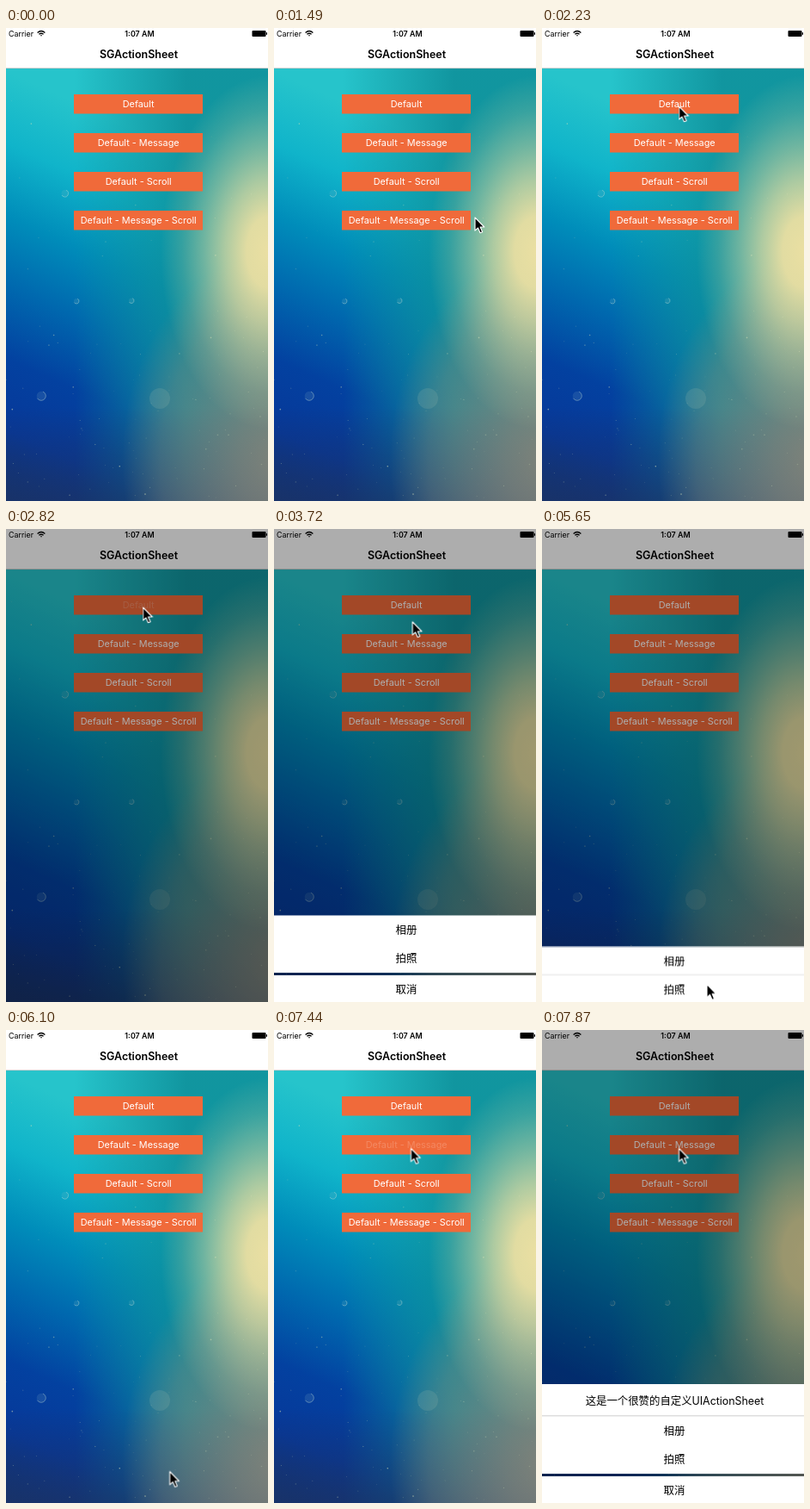
Recreate the animation shown at these times as an HTML page with a canvas. Size 305x549 px, loop 8000 ms.

```html
<!DOCTYPE html>
<html lang="en">
<head>
<meta charset="utf-8">
<title>SGActionSheet</title>
<style>
  html, body { margin: 0; width: 100%; height: 100%; overflow: hidden; background: #fff; }
  canvas, svg { position: absolute; left: 0; top: 0; width: 305px; height: 549px; display: block; }
  text { font-family: Inter, "Noto Sans CJK SC", "Noto Sans CJK", sans-serif; text-anchor: middle; }
  .status { font-size: 8.9px; }
  .title { font-size: 12.5px; font-weight: 600; }
  .label { font-size: 10.9px; fill: #fff; }
  .item { font-size: 12.5px; }
</style>
</head>
<body>
<canvas id="wall" width="305" height="549"></canvas>
<svg viewBox="0 0 305 549">
  <rect width="305" height="47" fill="#fff"/>
  <rect y="46.5" width="305" height=".6" fill="#a0a8a8"/>
  <text class="status" x="3" y="10" style="text-anchor:start">Carrier</text>
  <g fill="none" stroke="#000" stroke-width="1.3">
    <path d="M36.6 5.4Q41 1.6 45.4 5.4M38.4 7.3Q41 5.2 43.6 7.3"/>
    <path d="M39.9 8.3h2.2L41 9.8z" fill="#000" stroke="none"/>
  </g>
  <text class="status" x="155.5" y="10" font-weight="600">1:07 AM</text>
  <rect x="286.5" y="3" width="16" height="7" rx="1"/>
  <rect x="302.8" y="5.2" width="1.2" height="2.6"/>
  <text class="title" x="154.5" y="35">SGActionSheet</text>
  <g id="buttons"></g>
  <rect id="dim" width="305" height="549" fill="#000"/>
  <g id="sheet">
    <g id="message">
      <rect y="411" width="305" height="37.5" fill="#fff"/>
      <rect y="447" width="305" height="2" fill="#dedede"/>
      <text class="item" x="154.5" y="434.5" style="font-size:12.4px">这是一个很赞的自定义UIActionSheet</text>
    </g>
    <rect y="448.5" width="305" height="66.5" fill="#fff"/>
    <rect id="line" y="480.5" width="305" height="1" fill="#e2e2e2"/>
    <rect y="518" width="305" height="32" fill="#fff"/>
    <text class="item" x="154" y="469.5">相册</text>
    <text class="item" x="154" y="502.5">拍照</text>
    <text class="item" x="154" y="538.7">取消</text>
  </g>
  <path id="cursor" d="M0 0V15.2L3.5 12L6 17.8L8.6 16.7L6.1 11H10.8Z"
        stroke="#fff" stroke-width="1.1" stroke-linejoin="round"/>
</svg>
<script>
const $ = id => document.getElementById(id);
const clamp = u => Math.min(1, Math.max(0, u));
const ease = u => u < .5 ? 2 * u * u : 1 - 2 * (1 - u) ** 2;

// Wallpaper: water, haze, warm light, bubbles and specks
const g = $('wall').getContext('2d');

function wash(grad, colors) {
  colors.forEach((c, i) => grad.addColorStop(i / (colors.length - 1), c));
  g.fillStyle = grad;
  g.fillRect(-400, -600, 800, 1200);
}

// Elliptical light whose alpha falls off evenly through the given values
function light(x, y, rx, ry, rgb, alphas) {
  g.save();
  g.translate(x, y);
  g.scale(rx / 100, ry / 100);
  wash(g.createRadialGradient(0, 0, 0, 0, 0, 100), alphas.map(a => `rgba(${rgb},${a})`));
  g.restore();
}

function disc(x, y, r, fill) {
  g.beginPath();
  g.arc(x, y, r, 0, 7);
  g.fillStyle = fill;
  g.fill();
}

function paintWall() {
  wash(g.createLinearGradient(0, 50, -187, 466),
    ['#26c4cb', '#10b4ca', '#008dba', '#0067ae', '#0341a0', '#073899', '#13336f']);
  wash(g.createLinearGradient(80, 0, 210, 0), ['rgba(14,143,153,0)', 'rgba(14,143,153,.88)']);
  wash(g.createLinearGradient(0, 440, 0, 549), ['rgba(26,50,102,0)', 'rgba(26,50,102,.7)']);
  light(315, 500, 180, 240, '138,133,120', [.9, .76, .58, .38, 0]);
  light(305, 260, 125, 205, '234,223,162', [1, .96, .72, .44, .18, 0]);

  disc(179, 430, 12, 'rgba(160,190,170,.18)');
  for (const [x, y, r] of [[41, 427, 5.3], [68.5, 192, 4], [82, 317, 3], [146, 316.5, 3]]) {
    disc(x, y, r, 'rgba(140,190,200,.15)');
    g.strokeStyle = 'rgba(200,225,215,.5)';
    g.lineWidth = .8;
    g.beginPath();
    g.arc(x, y, r, -1.2, 2.6);
    g.stroke();
  }
  let seed = 11;
  const rnd = () => (seed = seed * 16807 % 2147483647) / 2147483647;
  for (let i = 0; i < 120; i++) {
    const y = 70 + 475 * Math.sqrt(rnd());
    disc(305 * rnd(), y, .4 + .5 * rnd() ** 3, `rgba(220,228,185,${.12 + .5 * rnd()})`);
  }
}
paintWall();

$('buttons').innerHTML = ['Default', 'Default - Message', 'Default - Scroll', 'Default - Message - Scroll']
  .map((s, i) => `<rect x="79" y="${77 + i * 45}" width="150" height="22.5" fill="#f06a3a"/>
    <text class="label" id="label${i}" x="154.2" y="${92 + i * 45}">${s}</text>`).join('');

// Everything moves on a coarse clock of equal ticks
const LOOP = 8000, TICK = 148.4;
const OPEN1 = 19, CLOSE = 37, GONE = 39, OPEN2 = 50;

function play(id, prop, valueAt) {
  const keys = [];
  for (let n = 0; n * TICK < LOOP; n++)
    keys.push({ offset: n * TICK / LOOP, [prop]: valueAt(n), easing: 'steps(1, end)' });
  keys.push({ ...keys[keys.length - 1], offset: 1 });
  $(id).animate(keys, { duration: LOOP, iterations: Infinity });
}

const shift = (x, y) => `translate(${x}px, ${y}px)`;

// start tick, ticks taken, end point
const glides = [[10, 5, 159.5, 91], [24, 6, 191, 393.5], [31, 3, 192, 528.5], [40, 7, 159.5, 137.5]];

function cursorAt(n) {
  if (n < glides[0][0]) return shift(-50, -50);
  let x = 234, y = 220;
  for (const [start, len, endX, endY] of glides) {
    const e = ease(clamp((n - start) / len));
    x += (endX - x) * e;
    y += (endY - y) * e;
  }
  return shift(x, y);
}

// How far the sheet is hidden, 0 to 1
function hidden(n) {
  if (n >= OPEN2) return 1 - ease(clamp((n - OPEN2) / 3));
  if (n >= CLOSE) return clamp((n - CLOSE) / 2) ** 1.5;
  return 1 - ease(clamp((n - OPEN1) / 3));
}

const labelFade = start => n => n < start ? 1 : clamp(.2 + .8 * (n - start) / 3);

play('cursor', 'transform', cursorAt);
play('sheet', 'transform', n => shift(0, hidden(n) * (n < OPEN2 ? 103 : 140)));
play('line', 'opacity', n => hidden(n) ? 1 : 0);
play('message', 'opacity', n => n < OPEN2 ? 0 : 1);
play('dim', 'opacity', n => n >= OPEN1 && n < GONE || n > OPEN2 ? .32 : 0);
play('label0', 'opacity', labelFade(OPEN1));
play('label1', 'opacity', labelFade(OPEN2));
</script>
</body>
</html>
```
